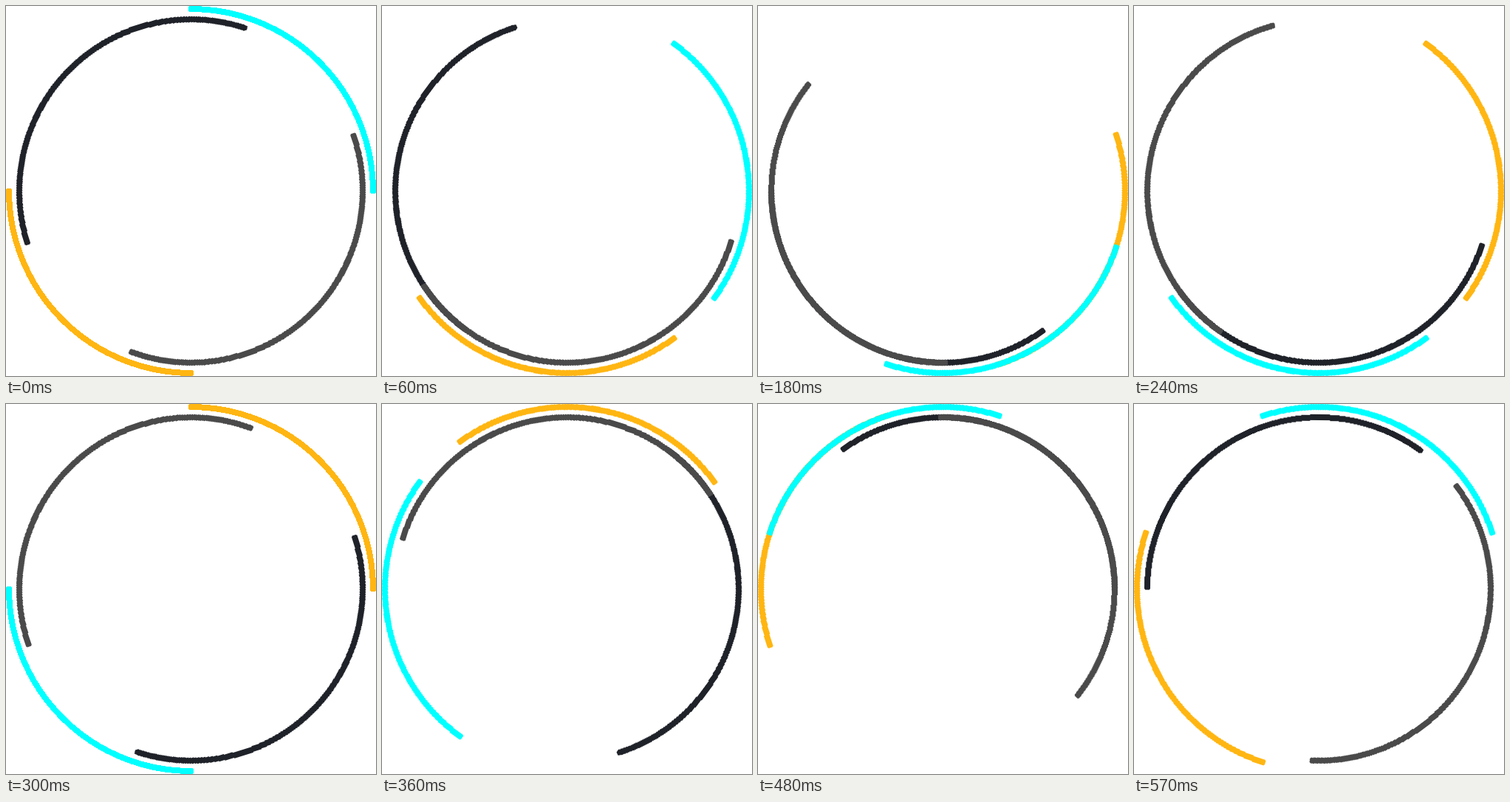
Recreate the animation shown at these times as an HTML page. Size 501 by 501 pixels, loop 0.6 s.

```html
<!DOCTYPE html>
<html lang="en">
<head>
<meta charset="utf-8">
<title>Spinning arcs</title>
<style>
  html, body {
    margin: 0;
    width: 100%;
    height: 100%;
    overflow: hidden;
    background: #fff;
  }
  svg { display: block; width: 501px; height: 501px; }

  /* --from is the arc's first end, clockwise from three o'clock */
  circle {
    fill: none;
    stroke-width: 8;
    stroke-linecap: round;
    shape-rendering: crispEdges;
    transform-origin: 250.5px 250.5px;
    animation: spin 600ms steps(20) infinite;
  }
  .outer { r: 246.5px; stroke-dasharray: 90 360; }
  .inner { r: 232.5px; }

  .yellow { --from: 90deg; --turn: -360deg; stroke: #ffb612; }
  .cyan { --from: -90deg; --turn: 360deg; stroke: #0ff; }
  .dark { --from: 162.6deg; --turn: -360deg; stroke: #1f2229; stroke-dasharray: 125.5 360; }
  .grey { --from: -18.75deg; --turn: 360deg; stroke: #4a4a4b; stroke-dasharray: 128.95 360; }

  @keyframes spin {
    from { transform: rotate(var(--from)); }
    to { transform: rotate(calc(var(--from) + var(--turn))); }
  }
</style>
</head>
<body>
<svg viewBox="0 0 501 501">
  <circle class="outer yellow" cx="250.5" cy="250.5" r="246.5" pathLength="360"/>
  <circle class="outer cyan" cx="250.5" cy="250.5" r="246.5" pathLength="360"/>
  <circle class="inner dark" cx="250.5" cy="250.5" r="232.5" pathLength="360"/>
  <circle class="inner grey" cx="250.5" cy="250.5" r="232.5" pathLength="360"/>
</svg>
</body>
</html>
```
